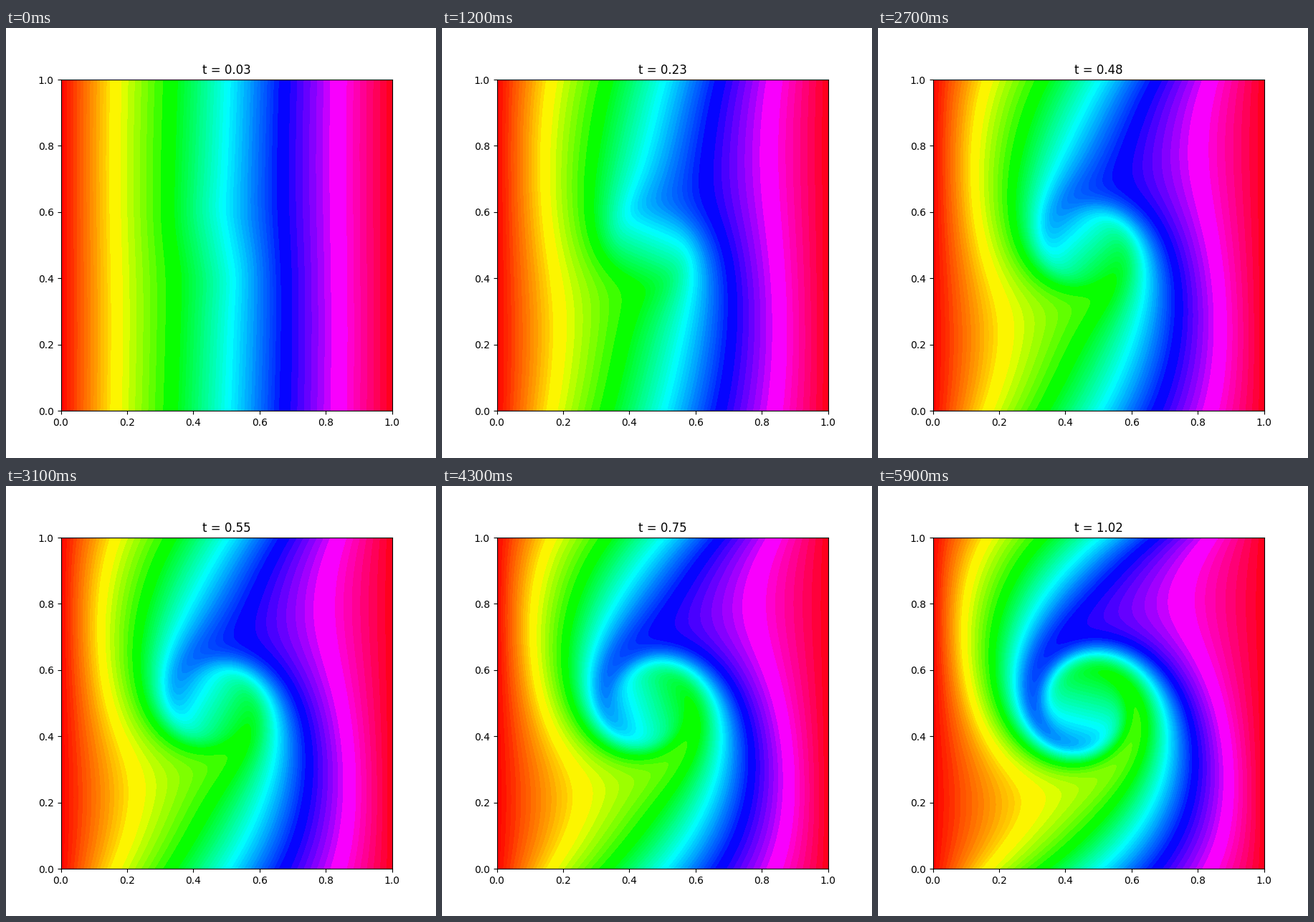
A matplotlib script that plays this animation: 600 by 600 pixels, repeating every 6000 ms.

```python
import numpy as np
import matplotlib.pyplot as plt
from matplotlib.animation import FuncAnimation

FRAMES = 60
DT = 1 / 60
LEAD = 2          # time steps taken before the first picture
GRID = 161
STRENGTH = 0.076  # circulation / 2 pi

LEVELS = np.r_[0:0.145:0.01, 0.15, 0.185:0.30:0.02, 0.31, 0.355:0.65:0.01,
               0.66, 0.695:0.81:0.02, 0.815, 0.865:0.99:0.02, 1]


def wall(s):
    """Damping that brings the flow to rest on the walls."""
    return 1 - (2 * s - 1) ** 4


def velocity(p, t):
    """Slowly spreading vortex in a closed box."""
    x, y = p
    dx = x - 0.463
    dy = y - (0.5 - 0.014 * t)
    core = 0.0144 + 0.006 * t
    spin = STRENGTH / np.cbrt((dx**2 + dy**2) ** 3 + core**3)
    spin = spin * wall(x) * wall(y)
    return np.array([-dy * spin, dx * spin])


def step(p, t):
    """One Runge-Kutta step."""
    k1 = velocity(p, t)
    k2 = velocity(p + DT / 2 * k1, t + DT / 2)
    k3 = velocity(p + DT / 2 * k2, t + DT / 2)
    k4 = velocity(p + DT * k3, t + DT)
    return p + DT / 6 * (k1 + 2 * k2 + 2 * k3 + k4)


# Carry a grid of particles along; each keeps the colour of its first x.
side = np.linspace(0, 1, GRID)
start = np.array(np.meshgrid(side, side))
paths = [start]
for n in range(FRAMES + LEAD):
    paths.append(step(paths[-1], n * DT))

fig, ax = plt.subplots(figsize=(6, 6), dpi=100)
ax.set_aspect("equal")
ax.set_xlim(0, 1)
ax.set_ylim(0, 1)
title = ax.set_title("")
shown = []


def update(i):
    while shown:
        shown.pop().remove()
    n = i + LEAD
    x, y = paths[n]
    shown.append(ax.contourf(x, y, start[0], levels=LEVELS, cmap="hsv",
                             vmin=0, vmax=1))
    ax.set_xlim(0, 1)
    ax.set_ylim(0, 1)
    title.set_text(f"t = {n * DT:.2f}")
    return shown


anim = FuncAnimation(fig, update, frames=FRAMES, interval=100,
                     repeat=True, repeat_delay=0)
plt.show()
```
